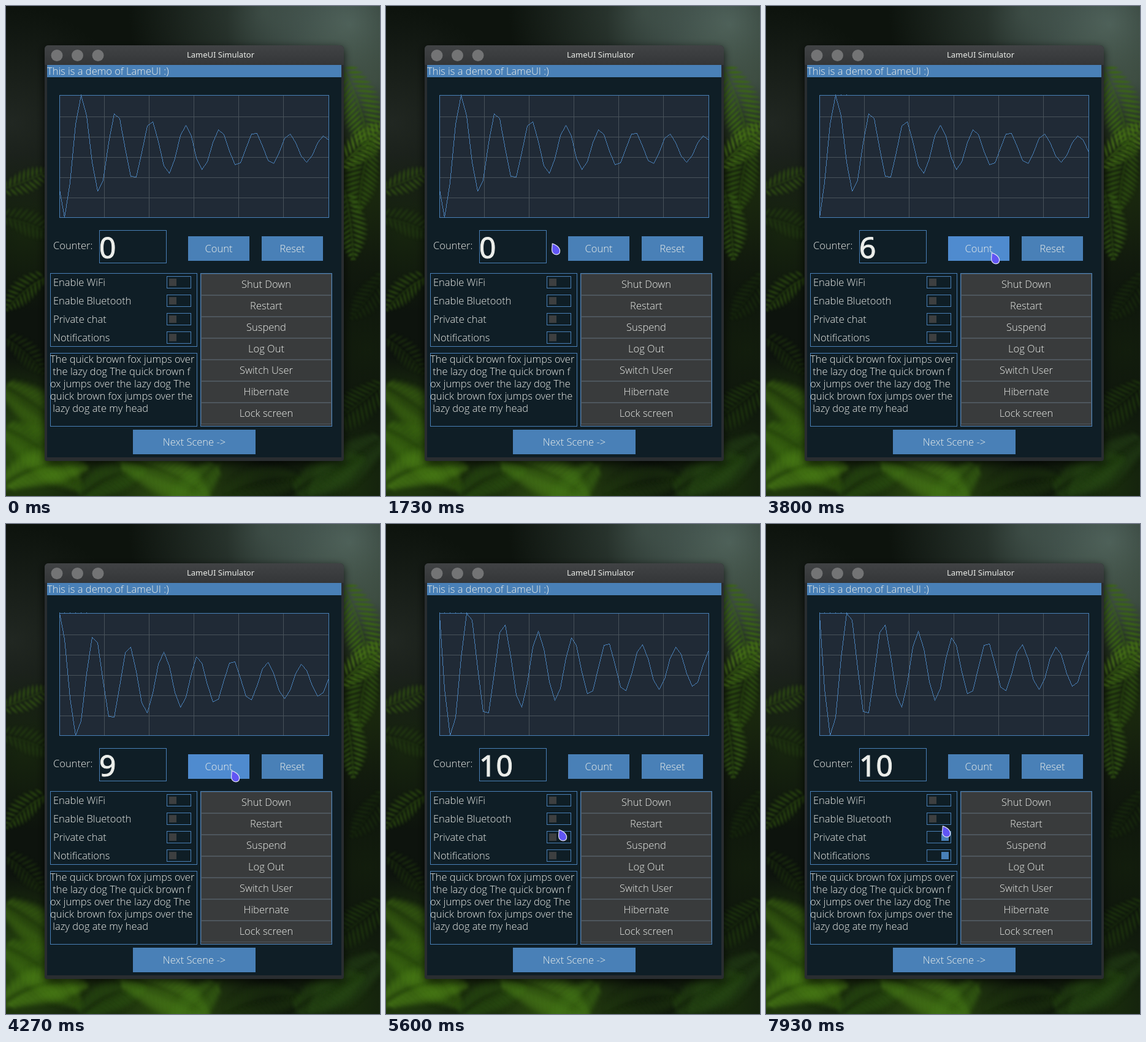
An HTML page with a canvas that plays this animation: 610 by 798 pixels, repeating every 8000 ms.

```html
<!DOCTYPE html>
<html lang="en">
<head>
<meta charset="utf-8">
<title>LameUI Simulator</title>
<style>
  html, body { margin: 0; width: 100%; height: 100%; overflow: hidden; background: #0b100c; }
  canvas { display: block; width: 610px; height: 798px; }
</style>
</head>
<body>
<canvas id="stage" width="610" height="798"></canvas>
<script>
const W = 610, H = 798, LOOP = 8000, TICK = 200 / 3;
const ctx = document.getElementById('stage').getContext('2d');
const BLUE = '#4980b7', DARK = '#0f1e26', GREY = '#393b3c', TEXT = '#eceeea';
const UI_FONT = '300 16.5px "Open Sans", "Noto Sans", sans-serif';

const MENU = ['Shut Down', 'Restart', 'Suspend', 'Log Out', 'Switch User', 'Hibernate', 'Lock screen'];
const SWITCHES = [['Enable WiFi'], ['Enable Bluetooth'], ['Private chat', 110], ['Notifications', 104]];
const STORY = ['The quick brown fox jumps over', ' the lazy dog The quick brown f',
  'ox jumps over the lazy dog The', 'quick brown fox jumps over the', ' lazy dog ate my head'];

// Button presses and releases, in ticks
const CLICKS = [[34, 36], [40, 42], [45, 47], [50, 51], [52, 53],
  [55, 57], [58, 59], [60, 61], [63, 64], [67, 68]];

// Pointer tip: tick, x, y
const PATH = [[5, 425, 721], [9, 385, 560], [13, 297, 352], [17, 235, 225], [19, 235, 225],
  [22, 217, 282], [26, 270, 386], [30, 367, 401], [68, 367, 401], [73, 317, 459],
  [79, 278, 548], [81, 278, 548], [87, 284, 446], [93, 268, 505], [96, 282, 526],
  [99, 285, 535], [106, 285, 535], [110, 288, 511], [115, 288, 511], [119, 287, 491]];

function box(c, x, y, w, h, fill, stroke) {
  if (fill) { c.fillStyle = fill; c.fillRect(x, y, w, h); }
  if (stroke) {
    c.strokeStyle = stroke; c.lineWidth = 1;
    c.strokeRect(x + .5, y + .5, w - 1, h - 1);
  }
}

function label(c, str, x, y, align = 'left', font = UI_FONT) {
  c.font = font; c.textAlign = align; c.fillStyle = TEXT;
  c.fillText(str, x, y);
}

function rule(c, x1, y1, x2, y2) {
  c.beginPath(); c.moveTo(x1, y1); c.lineTo(x2, y2); c.stroke();
}

function glow(c, x, y, r, color) {
  const g = c.createRadialGradient(x, y, 0, x, y, r);
  g.addColorStop(0, color); g.addColorStop(1, color.slice(0, 7) + '00');
  c.fillStyle = g; c.fillRect(0, 0, W, H);
}

// A frond: curved stem with tapering leaflets on both sides
function fern(c, x, y, angle, len, bend, color) {
  const n = Math.round(len / 8);
  c.fillStyle = c.strokeStyle = color;
  c.lineWidth = 1.5;
  c.beginPath(); c.moveTo(x, y);
  for (let i = 0; i < n; i++) {
    const a = angle + bend * i / n;
    x += Math.cos(a) * 8; y += Math.sin(a) * 8;
    c.lineTo(x, y);
  }
  c.stroke();
  for (let i = n; i > 0; i--) {
    const a = angle + bend * i / n, size = len * .28 * Math.sin(Math.PI * (.15 + .8 * i / n));
    for (const side of [-1, 1]) {
      c.save();
      c.translate(x, y); c.rotate(a + side * 1.1);
      c.beginPath(); c.moveTo(0, 0);
      c.quadraticCurveTo(size * .4, -4, size, 0);
      c.quadraticCurveTo(size * .4, 4, 0, 0);
      c.fill();
      c.restore();
    }
    x -= Math.cos(a) * 8; y -= Math.sin(a) * 8;
  }
}

function drawForest(c) {
  box(c, 0, 0, W, H, '#0d130d');
  glow(c, 420, 10, 220, '#4a5c5599');
  glow(c, 560, 30, 200, '#6a827caa');
  glow(c, 600, 120, 150, '#4a5c4d99');
  glow(c, 10, 190, 190, '#2b312caa');
  glow(c, 30, 370, 130, '#1d300f99');
  glow(c, 590, 300, 170, '#24380f99');
  glow(c, 590, 560, 150, '#16250c88');
  glow(c, 20, 730, 160, '#3a6c0faa');
  glow(c, 270, 800, 170, '#3d6c10aa');
  glow(c, 560, 780, 150, '#213d0d99');
  c.filter = 'blur(1.5px)';
  fern(c, -10, 300, -.3, 85, -.2, '#2c4812');
  fern(c, -12, 345, .1, 95, .5, '#1f3410');
  fern(c, 70, 440, 2.7, 90, -.5, '#26400f');
  fern(c, -5, 540, .5, 85, .5, '#18280d');
  fern(c, 545, 95, 1.05, 145, .4, '#3a6612');
  fern(c, 540, 265, -.75, 110, .1, '#456d16');
  fern(c, 598, 215, 1.9, 120, -.3, '#2b4b10');
  fern(c, 552, 300, 1.35, 110, .2, '#315413');
  fern(c, 620, 430, 2.1, 95, .2, '#16260d');
  fern(c, 620, 610, 2.4, 130, .2, '#1b300d');
  c.filter = 'blur(3px)';
  fern(c, -10, 620, .5, 150, .3, '#4a7c14');
  fern(c, -10, 690, .4, 160, .5, '#447613');
  fern(c, -5, 790, -.7, 140, .9, '#57901a');
  fern(c, 120, 810, -.8, 120, .7, '#2f5a12');
  fern(c, 180, 740, .2, 160, .4, '#548c1c');
  fern(c, 350, 745, 2.4, 130, -.3, '#427617');
  fern(c, 355, 805, -.5, 130, .5, '#20390f');
  fern(c, 620, 705, 2.6, 150, -.2, '#29491a');
  fern(c, 470, 800, -.7, 130, .4, '#2b5015');
  c.filter = 'none';
}

function drawWindow(c) {
  c.save();
  c.shadowColor = '#000b'; c.shadowBlur = 14; c.shadowOffsetY = 4;
  c.fillStyle = '#292d30';
  c.beginPath(); c.roundRect(63, 64, 488, 677, [6, 6, 4, 4]); c.fill();
  c.restore();
  const bar = c.createLinearGradient(0, 64, 0, 96);
  bar.addColorStop(0, '#414345'); bar.addColorStop(1, '#343638');
  c.fillStyle = bar;
  c.beginPath(); c.roundRect(63, 64, 488, 32, [6, 6, 0, 0]); c.fill();
  c.fillStyle = '#737475';
  for (const x of [83, 116.5, 150]) {
    c.beginPath(); c.arc(x, 80.5, 9.5, 0, 7); c.fill();
  }
  label(c, 'LameUI Simulator', 350, 84, 'center', '13px "Noto Sans", sans-serif');

  box(c, 67, 96, 480, 639, DARK);
  box(c, 67, 96, 480, 20, BLUE);
  label(c, 'This is a demo of LameUI :)', 67, 112);

  box(c, 87, 145, 440, 200, '#202a36');
  c.strokeStyle = '#48525a'; c.lineWidth = 1;
  for (let i = 0; i < 5; i++) {
    rule(c, 160.5 + 73 * i, 145, 160.5 + 73 * i, 345);
    rule(c, 87, 180.5 + 33 * i, 527, 180.5 + 33 * i);
  }
  box(c, 87, 145, 440, 200, null, BLUE);

  label(c, 'Counter:', 77, 396);
  box(c, 152, 365, 110, 54, null, BLUE);

  box(c, 72, 435, 240, 120, null, BLUE);
  SWITCHES.forEach(([name], i) => {
    label(c, name, 77, 456 + 30 * i);
    box(c, 262, 440 + 30 * i, 40, 20, null, BLUE);
  });
  box(c, 72, 565, 240, 120, null, BLUE);
  STORY.forEach((line, i) => label(c, line, 72, 581 + 20 * i));
}

const back = document.createElement('canvas');
back.width = W; back.height = H;

function paintBack() {
  const c = back.getContext('2d');
  drawForest(c);
  drawWindow(c);
}

function pointerAt(k) {
  if (k < PATH[0][0]) return null;
  const i = PATH.findIndex(p => p[0] > k);
  if (i < 0) return PATH[PATH.length - 1].slice(1);
  const [t0, x0, y0] = PATH[i - 1], [t1, x1, y1] = PATH[i];
  const u = (k - t0) / (t1 - t0);
  return [x0 + (x1 - x0) * u, y0 + (y1 - y0) * u];
}

// Plot of sin(n) / n over 50 samples, scaled to its own range
function wave(count) {
  const start = count ? count + 5 : 10;
  const v = Array.from({ length: 50 }, (_, i) => Math.sin(start + i) / (start + i));
  const top = Math.max(...v), low = Math.min(...v);
  return {
    peak: v.indexOf(top), start,
    pts: v.map((f, i) => [Math.floor(87 + i * 439 / 49), Math.floor(145 + (top - f) / (top - low) * 199)])
  };
}

// Crisp one-pixel line without smoothing
function pixelLine(c, [x0, y0], [x1, y1]) {
  const n = Math.max(Math.abs(x1 - x0), Math.abs(y1 - y0));
  for (let i = 0; i <= n; i++) {
    const u = n ? i / n : 0;
    c.fillRect(Math.round(x0 + (x1 - x0) * u), Math.round(y0 + (y1 - y0) * u), 1, 1);
  }
}

function drawPlot(count) {
  const { pts } = wave(count);
  ctx.fillStyle = BLUE;
  for (let i = 1; i < pts.length; i++) pixelLine(ctx, pts[i - 1], pts[i]);
  // Each peak leaves a speck just above the frame
  for (let k = 0; k <= count; k++) {
    const w = wave(k);
    if (w.start > 8) ctx.fillRect(w.pts[w.peak][0], 144, 1, 1);
  }
}

function drawPointer([x, y]) {
  ctx.save();
  ctx.translate(Math.round(x), Math.round(y));
  ctx.beginPath();
  ctx.moveTo(1.2, .8);
  ctx.bezierCurveTo(7, 2.5, 13.6, 7, 13.6, 13);
  ctx.bezierCurveTo(13.6, 16.8, 11, 18.8, 7.8, 18.8);
  ctx.bezierCurveTo(3.5, 18.8, .8, 15.5, .6, 11.5);
  ctx.bezierCurveTo(.4, 8, 1.5, 4, 1.2, .8);
  ctx.fillStyle = '#6155f4'; ctx.fill();
  ctx.strokeStyle = '#e4e3f4'; ctx.lineWidth = 1.2; ctx.stroke();
  ctx.restore();
}

function drawCounter(count) {
  label(ctx, String(count), 152, 411, 'left', '48px "Noto Sans", "Open Sans", sans-serif');
  ctx.strokeStyle = TEXT; ctx.lineWidth = 1;
  ctx.strokeText(String(count), 152, 411);
}

function draw(t) {
  const k = Math.floor((t + 5) / TICK);
  const tip = pointerAt(k);
  const over = (x, y, w, h) => tip && tip[0] >= x && tip[0] < x + w && tip[1] >= y && tip[1] < y + h;
  const count = CLICKS.filter(c => k >= c[1]).length;
  const pressed = CLICKS.some(c => k >= c[0] && k < c[1]);
  const button = (str, x, y, w, down) => {
    const hover = over(x, y, w, 40);
    box(ctx, x, y, w, 40, down ? '#56a0e5' : hover ? '#4f8bcf' : BLUE);
    label(ctx, str, x + w / 2, y + 26, 'center');
  };

  ctx.drawImage(back, 0, 0);
  drawPlot(count);
  drawCounter(count);

  button('Count', 297, 375, 100, pressed);
  button('Reset', 417, 375, 100);
  button('Next Scene ->', 207, 690, 200);

  SWITCHES.forEach(([, since], i) => {
    const on = k >= since;
    box(ctx, on ? 286 : 266, 444 + 30 * i, 12, 12, on ? BLUE : '#3d3f40');
  });

  box(ctx, 317, 435, 215, 250, GREY, BLUE);
  MENU.forEach((name, i) => {
    const y = 436 + 35 * i;
    box(ctx, 318, y, 213, 35, over(317, y, 215, 35) ? '#4e565d' : GREY, '#4e565d');
    label(ctx, name, 424.5, y + 23, 'center');
  });

  if (tip) drawPointer(tip);
}

paintBack();
if (document.fonts && document.fonts.ready) document.fonts.ready.then(paintBack);
const begin = performance.now();
function frame() {
  draw((performance.now() - begin) % LOOP);
  requestAnimationFrame(frame);
}
frame();
</script>
</body>
</html>
```
